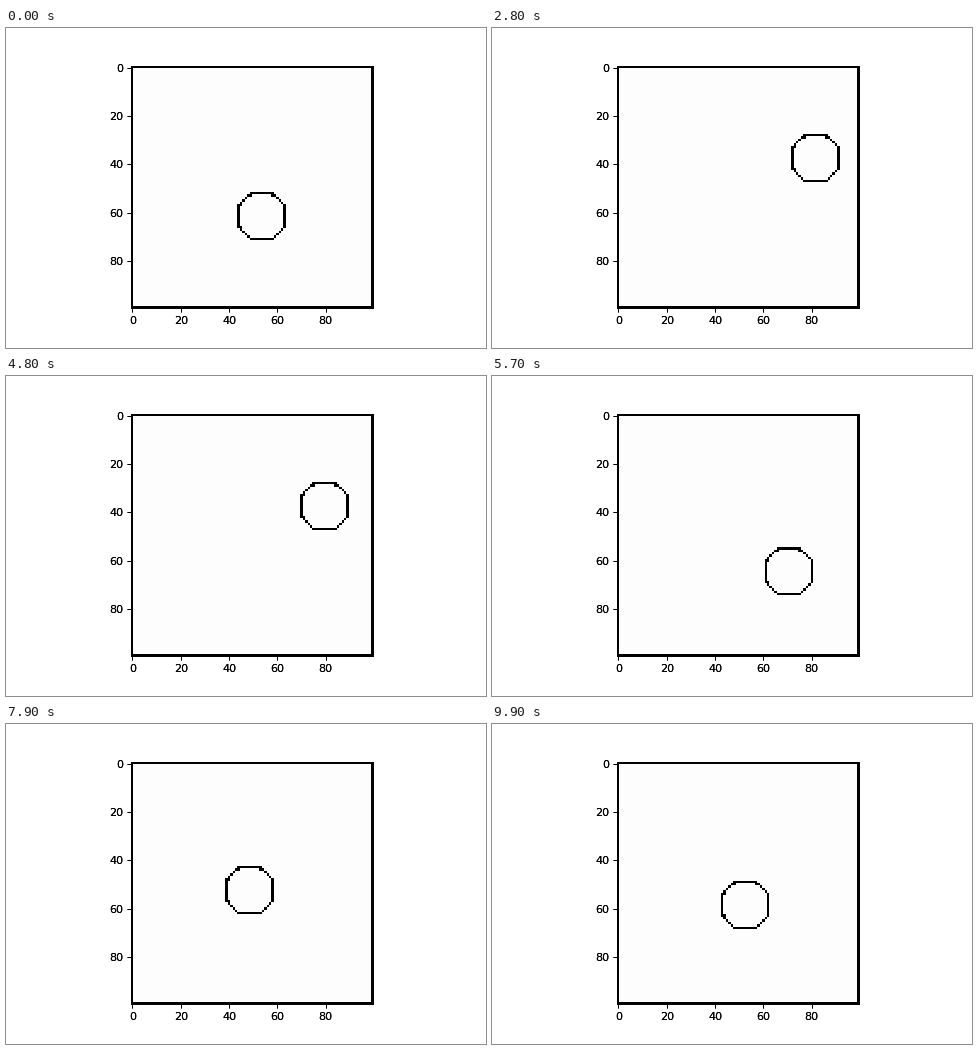
A matplotlib script that plays this animation: 480 px wide and 320 px high, repeating every 10000 ms.

```python
import numpy as np
import matplotlib.pyplot as plt
from matplotlib.animation import FuncAnimation

SIZE, R, STEPS = 100, 10, 100
PAPER = 253


def ring_cells():
    """Cells of the ball outline, relative to its centre."""
    arc = [(9, i) for i in range(5)] + [(i, 9) for i in range(5)]
    arc += [(13 - i, i) for i in range(5, 9)]
    cells = set()
    for sx in (-1, 1):
        for sy in (-1, 1):
            corner = list(arc)
            if sx < 0:
                corner.append((8, 4))
            if sy < 0:
                corner.append((4, 8))
            for x, y in corner:
                cells.add((x if sx > 0 else -1 - x, y if sy > 0 else -1 - y))
    return np.array(sorted(cells))


def bounce_path():
    """Ball centres for one run from the middle of the box."""
    pos, vel = np.array([50, 50]), np.array([1, 3])
    path = []
    for _ in range(STEPS):
        pos = pos + vel
        path.append(pos)
        vel = np.where((pos < R) | (pos > SIZE - R), -vel, vel)
    return path


RING = ring_cells()
PATH = bounce_path()


def render(k):
    img = np.full((SIZE, SIZE), PAPER)
    img[[0, -1], :] = 0
    img[:, [0, -1]] = 0
    cells = RING + PATH[(k + 3) % STEPS]
    x, y = cells[((cells >= 0) & (cells < SIZE)).all(axis=1)].T
    img[y, x] = 0
    return img


fig = plt.figure(figsize=(6, 4), dpi=80, facecolor="white")
fig.subplots_adjust(left=0.125, right=0.9, bottom=0.125, top=0.88)
ax = fig.add_subplot()
view = ax.imshow(render(0), cmap="gray", vmin=0, vmax=255,
                 interpolation="nearest")

# A second set of axes darkens the labels and frame
over = fig.add_subplot(facecolor="none")
over.set(xlim=ax.get_xlim(), ylim=ax.get_ylim(), aspect="equal")
for a in (ax, over):
    a.set_xticks(range(0, SIZE, 20))
    a.set_yticks(range(0, SIZE, 20))


def update(k):
    view.set_data(render(k))
    return [view]


anim = FuncAnimation(fig, update, frames=STEPS, interval=100,
                     repeat=True, repeat_delay=0, blit=False)
plt.show()
```
